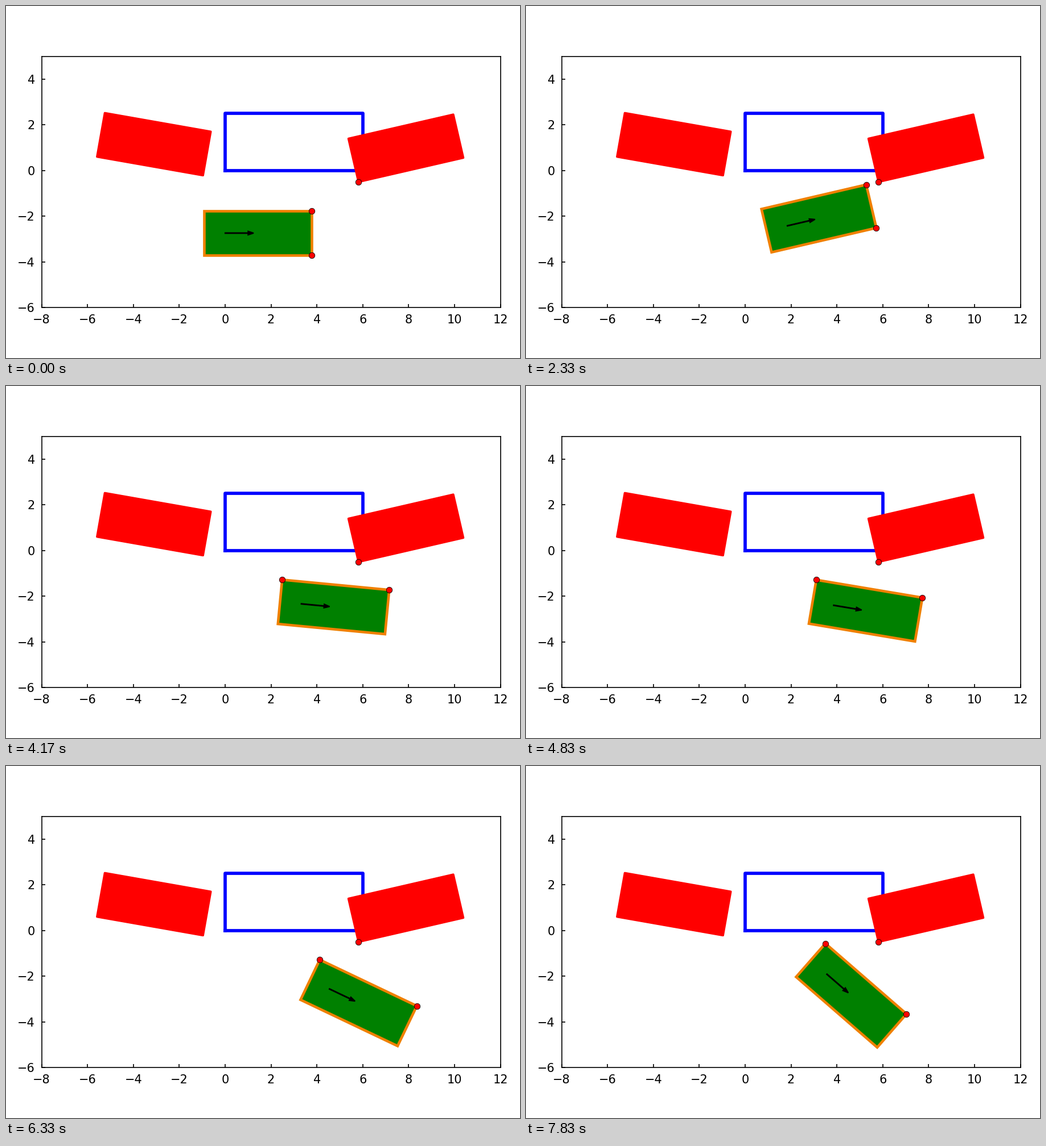
Write a matplotlib script that moves like this. It is 903 px wide and 620 px high and loops after 8000 ms.

```python
import numpy as np
import matplotlib.pyplot as plt
from matplotlib.animation import FuncAnimation
from matplotlib.patches import FancyArrow, Rectangle
from matplotlib.transforms import Affine2D

W, H, DPI = 903, 620, 150
LOOP_MS, STEPS = 8000, 48
TICKS = 4  # drawn frames per motion step

# Vehicle outline relative to the rear axle
FRONT, REAR, HALF = 3.76, 0.929, 0.971
LENGTH = FRONT + REAR

PARKED = [(-4.5, 1.4, -10), (6.5, 0.66, 13)]

# The car rolls at constant speed, either straight or at full steering lock
START = (0, -2.735)
FORWARD, REVERSE = 0.1355, -0.131  # distance per step
CURVE = np.radians(13.2)           # heading change per unit of distance
LAG = 0.2                          # steps lost while pulling away
LEGS = [  # distance, heading turn, speed
    (1.023, 1, FORWARD),
    (0.820, 0, FORWARD),
    (1.436, -1, FORWARD),
    (0.313, 0, FORWARD),
    (1.268, -1, FORWARD),
    (1.500, -1, REVERSE),
]


def unit(angle):
    return np.array([np.cos(angle), np.sin(angle)])


def drive(step):
    """Rear axle position and heading after following the legs."""
    pos, angle = np.array(START, float), 0.0
    left = max(step - LAG, 0)
    for dist, turn, speed in LEGS:
        time = min(left, dist / abs(speed))
        left -= time
        half = turn * CURVE * abs(speed) * time / 2
        pos = pos + speed * time * np.sinc(half / np.pi) * unit(angle + half)
        angle += 2 * half
    return pos, angle


def place(points, origin, angle):
    d, n = unit(angle), unit(angle + np.pi / 2)
    return [origin + px * d + py * n for px, py in points]


def closest(pos, angle):
    """Nearest edge of the car and nearest point of the right obstacle."""
    rear_left, front_left, front_right = place(
        [(-REAR, HALF), (FRONT, HALF), (FRONT, -HALF)], pos, angle)
    gap = corner - front_left
    if gap @ unit(angle) > gap @ unit(angle + np.pi / 2):
        slide = np.clip((front_left - corner) @ side, 0, 2 * HALF)
        return front_left, front_right, corner + slide * side
    return rear_left, front_left, corner


ox, oy, odeg = PARKED[1]
corner = place([(-REAR, -HALF)], np.array([ox, oy]), np.radians(odeg))[0]
side = unit(np.radians(odeg + 90))

fig = plt.figure(figsize=((W + 1e-6) / DPI, (H + 1e-6) / DPI), dpi=DPI,
                 facecolor="white")
ax = fig.add_axes([62.6 / W, 88.55 / H, 806 / W, 442.9 / H])
ax.set(xlim=(-8, 12), ylim=(-6, 5))
ax.set_xticks(range(-8, 13, 2))
ax.set_yticks(range(-6, 5, 2))
ax.tick_params(direction="in", length=3, pad=5.6, labelsize=10)

ax.plot([0, 6, 6, 0, 0], [0, 0, 2.5, 2.5, 0], color="blue", lw=2.75,
        solid_joinstyle="round", zorder=1)


def car_box(pose, **style):
    return ax.add_patch(Rectangle((-REAR, -HALF), LENGTH, 2 * HALF,
                                  transform=pose + ax.transData, **style))


for x, y, deg in PARKED:
    car_box(Affine2D().rotate_deg(deg).translate(x, y), fc="red", ec="red",
            lw=1.8, joinstyle="round", zorder=2)

pose = Affine2D()
car_box(pose, fc="green", ec="#f08000", lw=2.2, zorder=3)
arrow = FancyArrow(0, 0, 1, 0, width=0.02, head_width=0.16, head_length=0.24,
                   fc="black", ec="black", lw=1, zorder=4)
arrow.set_transform(pose + ax.transData)
ax.add_artist(arrow)
dots, = ax.plot([], [], "o", ms=5, mfc="red", mec="black", mew=0.4, zorder=5)


def update(tick):
    step = min((tick + 1) // TICKS, STEPS - 1)
    pos, angle = drive(step)
    pose.clear().rotate(angle).translate(*pos)
    dots.set_data(*np.transpose(closest(pos, angle)))
    return [dots]


anim = FuncAnimation(fig, update, frames=STEPS * TICKS,
                     interval=LOOP_MS / (STEPS * TICKS),
                     init_func=lambda: update(0), repeat=True, repeat_delay=0)
plt.show()
```
